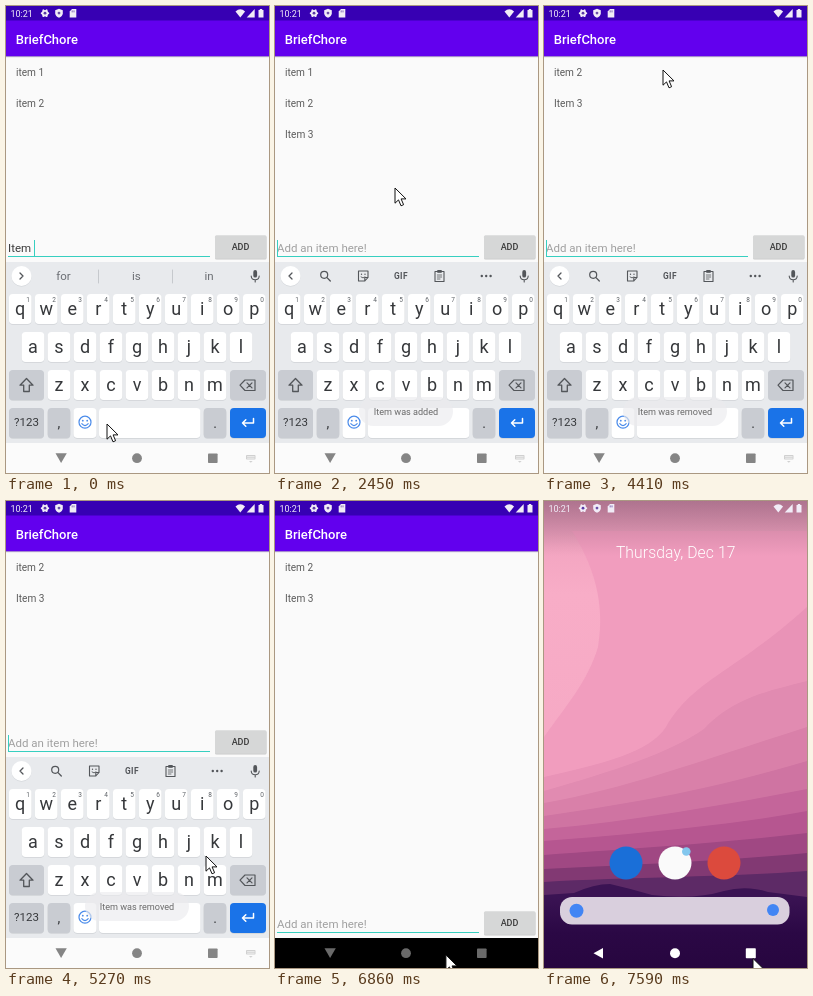
Recreate the animation shown at these times as an HTML page. Size 263 px wide and 467 px high, loop 8000 ms.

```html
<!DOCTYPE html>
<html lang="en">
<head>
<meta charset="utf-8">
<title>To-do list demo</title>
<style>
html, body { margin: 0; width: 100%; height: 100%; overflow: hidden; background: #fafafa; }
svg { display: block; width: 100vw; height: 100vh; font-family: Roboto, "Noto Sans", sans-serif; }
</style>
</head>
<body>
<svg id="stage" viewBox="0 0 263 467"></svg>
<script>
const LOOP = 8000;
const stage = document.getElementById('stage');

// Markup helpers
const rect = (x, y, w, h, fill, r = 0, more = '') =>
  `<rect x="${x}" y="${y}" width="${w}" height="${h}" rx="${r}" fill="${fill}" ${more}/>`;
const circle = (x, y, r, fill, more = '') =>
  `<circle cx="${x}" cy="${y}" r="${r}" fill="${fill}" ${more}/>`;
const path = (d, fill, more = '') => `<path d="${d}" fill="${fill}" ${more}/>`;
const line = (d, color, w = 1.2) =>
  path(d, 'none', `stroke="${color}" stroke-width="${w}" stroke-linecap="round" stroke-linejoin="round"`);
const text = (s, x, y, size, fill, more = '') =>
  `<text x="${x}" y="${y}" font-size="${size}" fill="${fill}" ${more}>${s}</text>`;
const mid = 'text-anchor="middle"';
const group = (id, body, more = '') => `<g id="${id}" ${more}>${body}</g>`;

function statusIcons() {
  const c = '#f1ecf7';
  let teeth = '';
  for (let i = 0; i < 6; i++) {
    const a = i * Math.PI / 3;
    teeth += `M39 7.2L${39 + 3.3 * Math.cos(a)} ${7.2 + 3.3 * Math.sin(a)}`;
  }
  return text('10:21', 4.5, 10.8, 9, c) +
    line(teeth, c, 1.9) + circle(39, 7.2, 3.2, c) + circle(39, 7.2, 1.4, '#5a3aa6') +
    path('M53 2.8L56.8 4.2V7.2Q56.6 10.3 53 11.8Q49.4 10.3 49.2 7.2V4.2Z', c) +
    circle(53, 7.1, 1.4, '#6b50a8') +
    path('M66 3H70.3V11.5H63.7V5.4Z', c) + line('M66.2 4.8V6M68 4.8V6', '#6b50a8', .8) +
    path('M229.5 5.4Q234.3 1.3 239.1 5.4L234.3 11.5Z', c) +
    path('M248.7 3V11.4H240.7Z', c) +
    path('M253.8 3H256.2V4H257.5V11.5H252.5V4H253.8Z', c);
}

function key(label, cx, top, w, fill = '#fff', size = 18, base = 20.5) {
  const x = cx - w / 2;
  return rect(x, top + .8, w, 30, '#cfd2d6', 4) + rect(x, top, w, 30, fill, 4) +
    text(label, cx, top + base, size, '#36383b', mid);
}

function keyboard() {
  const gray = '#c9ccd2', ink = '#53565a';
  let s = rect(0, 256, 263, 181, '#e8eaed');
  [...'qwertyuiop'].forEach((c, i) => {
    const x = 14.2 + i * 26;
    s += key(c, x, 288, 22.6) + text((i + 1) % 10, x + 8, 295.8, 6.5, '#5f6368', mid);
  });
  [...'asdfghjkl'].forEach((c, i) => s += key(c, 27 + i * 26, 326, 22.6));
  [...'zxcvbnm'].forEach((c, i) => s += key(c, 53 + i * 26, 364, 22.6));
  s += key('', 20.5, 364, 35, gray) + key('', 242, 364, 36, gray) +
    line('M20.5 372.5L27 379.2H23.3V385.5H17.7V379.2H14Z', ink, 1.3) +
    line('M239 374H249V384.5H239L234 379.2ZM241 376.8L246 381.8M246 376.8L241 381.8', ink, 1.2);
  s += key('?123', 20.5, 402, 35, gray, 11.5, 18.3) + key(',', 53, 402, 22.6, gray, 14, 19.5) +
    key('', 79, 402, 23, '#fff') + key('', 143.7, 402, 101.5) +
    key('.', 209, 402, 22.6, gray, 14, 19.5) + key('', 242, 402, 36, '#1a73e8');
  s += circle(79, 416.2, 6, 'none', 'stroke="#4a8bea" stroke-width="1.2"') +
    circle(76.8, 414.7, .9, '#4a8bea') + circle(81.2, 414.7, .9, '#4a8bea') +
    line('M75.8 417.7Q79 421.5 82.2 417.7', '#4a8bea', 1.1) +
    line('M247.5 412.5V417H236.5M239.8 413.7L236.5 417L239.8 420.3', '#fff', 1.5);
  // Toolbar
  s += circle(15.5, 270.7, 10, '#d6d9dd') + circle(15.5, 270, 10, '#fff') +
    rect(247.3, 264, 3.8, 7.6, ink, 1.9) +
    line('M245.2 270Q245.4 273.7 249.2 273.7Q253 273.7 253.2 270M249.2 273.8V276', ink, 1.1);
  s += group('suggest',
    line('M14 267L17 270L14 273', ink, 1.3) +
    ['for', 'is', 'in'].map((w, i) => text(w, 57.5 + i * 72.8, 274.3, 11.5, '#6a6d72', mid)).join('') +
    line('M92.5 264V277M166.5 264V277', '#c6c9cd', 1));
  s += group('tools',
    line('M17 267L14 270L17 273', ink, 1.3) +
    circle(49.2, 268.8, 3.5, 'none', `stroke="${ink}" stroke-width="1.2"`) + line('M52 271.6L55.3 275', ink, 1.3) +
    line('M83.5 265H93V271.5L89.8 275H83.5ZM93 271.5H89.8V275', ink, 1.1) +
    circle(86.5, 268.3, .7, ink) + circle(90, 268.3, .7, ink) + line('M86 271Q88 273 90 271', ink, .9) +
    text('GIF', 126, 273, 8.4, ink, mid + ' font-weight="700" letter-spacing=".4"') +
    line('M160 265.5H169V275.5H160Z', ink, 1.1) + rect(162.3, 264, 4.4, 2.8, ink) +
    line('M162.3 269H166.7M162.3 271H166.7M162.3 273H165', ink, .8) +
    [206.8, 211.2, 215.6].map(x => circle(x, 270, 1.2, ink)).join(''));
  return s;
}

function inputRow() {
  return rect(209, 230, 51.5, 23.6, '#c9c9c9', 1.5) +
    rect(209, 229.3, 51.5, 23.5, '#d6d7d7', 1.5, 'id="button"') +
    text('ADD', 234.5, 244.3, 9, '#3a3a3a', mid + ' font-weight="500"') +
    text('', 2, 246, 11.5, '#333', 'id="field"') +
    rect(2, 250, 202, 1, '#37cfc0') +
    rect(0, 234, 1, 16, '#37cfc0', 0, 'id="caret"');
}

function appNav() {
  const c = '#858585';
  return rect(0, 437, 263, 30, '#fbfbfb', 0, 'id="navBack"') +
    group('navIcons', path('M49.5 447.3H60.8L55.1 457Z', c) + circle(131, 452.2, 4.9, c) +
      rect(202, 447.4, 9.6, 9.6, c, .8)) +
    group('navKeys', rect(240, 449, 9.5, 4.6, '#d0d0d0', .8) +
      line('M241.5 450.6H248.2M241.5 452.2H248.2', '#fff', .6) + path('M243 455H246.6L244.8 456.8Z', '#d0d0d0'));
}

function home() {
  const bands = [
    ['#f19dbe', 'M28 30C48 62 62 100 54 146C44 180 22 205 0 236V467H263V30Z'],
    ['#e993b7', 'M0 276C60 262 105 252 122 226C150 178 190 172 263 106V467H0Z'],
    ['#e18bb1', 'M0 290C70 270 125 252 160 228C190 196 225 190 263 180V467H0Z'],
    ['#d980a9', 'M0 302C80 288 150 262 263 226V467H0Z'],
    ['#cf74a2', 'M0 315C90 302 170 288 263 260V467H0Z'],
    ['#c4659a', 'M0 328C90 320 180 304 263 288V467H0Z'],
    ['#b65690', 'M0 340C80 334 190 324 263 310V467H0Z'],
    ['#a04883', 'M0 354C80 348 180 342 263 332V467H0Z'],
    ['#823973', 'M0 368C80 364 180 360 263 352V467H0Z'],
    ['#5d2a66', 'M0 381C80 376 190 376 263 370V467H0Z'],
    ['#3a1353', 'M0 394L30 392Q50 383 66 383Q88 388 108 394Q150 399 180 390Q202 384 224 391L263 396V467H0Z']
  ];
  let s = `<defs><linearGradient id="sky" x2="0" y2="1">
    <stop stop-color="#d490ad"/><stop offset=".1" stop-color="#f3a5c1"/><stop offset=".2" stop-color="#f8adc7"/><stop offset="1" stop-color="#f3a3c1"/></linearGradient>
    <linearGradient id="shade" x2="0" y2="1"><stop stop-color="#6b4058" stop-opacity=".36"/><stop offset="1" stop-color="#6b4058" stop-opacity="0"/></linearGradient>
    <linearGradient id="ground" x2="0" y2="1"><stop stop-color="#2b0845" stop-opacity="0"/><stop offset=".5" stop-color="#2b0845"/><stop offset="1" stop-color="#27063f"/></linearGradient></defs>`;
  s += rect(0, 0, 263, 467, 'url(#sky)');
  for (const [fill, d] of bands) s += path(d, fill);
  s += rect(0, 0, 263, 55, 'url(#shade)') + rect(0, 396, 263, 71, 'url(#ground)');
  s += group('dock',
    text('Thursday, Dec 17', 131.7, 56.5, 15.7, '#fff', mid + ' font-weight="300" letter-spacing=".1"') +
    circle(82, 362, 16.5, '#1a6fd8') + circle(131, 362, 16.5, '#fafafa') +
    circle(142.3, 350.5, 4.3, '#83c7ee') + circle(180, 362, 16.5, '#dc4a3d') +
    rect(16, 396, 229.5, 27.5, '#d9cfdd', 12) +
    circle(32.5, 409.7, 7, '#4285f4') + circle(229, 409, 6, '#4285f4'));
  return s + path('M59 447V457.4L49.5 452.2Z', '#fff') + circle(131, 452.2, 5, '#fff') +
    rect(201.8, 447.2, 10, 10, '#fff', .8);
}

stage.innerHTML =
  group('home', home()) +
  group('app',
    rect(0, 0, 263, 437, '#fafafa') + rect(0, 50, 263, 1, '#a58ad0') + rect(0, 51, 263, 1, '#eeecf1') +
    rect(0, 0, 263, 15, '#3700b3') + rect(0, 14.5, 263, 35.5, '#6200ee') +
    text('BriefChore', 9.7, 38, 13, '#fff', 'font-weight="500"') +
    [0, 1, 2].map(i => text('', 10, 70 + i * 31, 10.1, '#5c5c5c', `id="row${i}"`)).join('') +
    group('input', inputRow()) + group('keys', keyboard())) +
  group('nav', appNav()) +
  group('toast', rect(0, 391, 0, 29, '#ebecee', 14.5, 'id="pill" opacity=".65"') +
    text('', 131, 409.3, 9.1, '#6a6a6a', mid + ' id="note"')) +
  statusIcons() +
  group('mouse', path('M0 0V15.2L3.5 11.9L6 17.8L8.6 16.7L6.1 10.9H11Z', '#fff', 'stroke="#111" stroke-width="1" stroke-linejoin="round"'));

const el = {};
stage.querySelectorAll('[id]').forEach(n => el[n.id] = n);
const show = (n, on) => n.setAttribute('display', on ? 'inline' : 'none');
const fade = (t, a, b) => Math.min(1, Math.max(0, (t - a) / (b - a)));

// Screen updates come in bursts: first, last, count
const bursts = [[150, 150, 1], [450, 1390, 7], [1540, 2580, 9], [2720, 3260, 5],
  [3560, 4410, 7], [4730, 5270, 5], [5670, 6430, 7], [6710, 7590, 7]];
function snap(t) {
  let out = 0;
  for (const [a, b, n] of bursts) {
    if (t < a) break;
    const step = (b - a) / (n - 1) || 1;
    out = a + Math.min(n - 1, Math.floor((t - a) / step + 1e-6)) * step;
  }
  return out;
}

// Pointer stops: time, x, y
const stops = [[0, 101, 418], [450, 101, 418], [610, 120, 398], [770, 182, 315], [920, 237, 238.5],
  [1670, 237, 238.5], [1930, 205, 222], [2320, 124, 188], [2450, 120, 182], [2580, 120, 84],
  [2720, 119, 56], [2855, 119, 46], [3125, 119, 64], [4595, 119, 64], [4730, 150, 92],
  [4865, 224, 172], [5000, 235, 250], [5270, 200, 355], [5600, 200, 355], [5800, 176, 395],
  [6050, 138, 440], [6177, 132, 447], [6430, 132, 448], [6710, 142, 452], [6857, 171, 454],
  [7150, 205, 457], [7590, 209, 457.5]];
function pointer(t) {
  let i = 1;
  while (i < stops.length - 1 && stops[i][0] < t) i++;
  const [t0, x0, y0] = stops[i - 1], [t1, x1, y1] = stops[i];
  const k = fade(t, t0, t1);
  return [x0 + (x1 - x0) * k, y0 + (y1 - y0) * k];
}

const blinks = [0, 150, 450, 2055, 2315, 2715, 3255, 3700, 4120, 4725, 5265, 5665];
const caretOn = t => blinks.filter(b => b <= t).length % 2 === 1;

function draw(time) {
  const t = snap(time);
  const typed = t < 600 ? 'Item ' : t < 1540 ? 'Item 3' : '';
  const items = t < 1540 ? ['item 1', 'item 2'] : t < 3980 ? ['item 1', 'item 2', 'Item 3'] : ['item 2', 'Item 3'];
  items.concat('').slice(0, 3).forEach((s, i) => el['row' + i].textContent = s);

  el.field.textContent = typed || 'Add an item here!';
  el.field.setAttribute('fill', typed ? '#3c3c3c' : '#a0a0a0');
  el.caret.setAttribute('x', typed === 'Item ' ? 28 : typed ? 34 : 2);
  show(el.caret, caretOn(t));
  el.button.setAttribute('fill', t >= 1390 && t < 1670 ? '#c6c7c7' : '#d6d7d7');

  show(el.suggest, t < 760);
  show(el.tools, t >= 760);
  const closed = t >= 6700;
  show(el.keys, !closed);
  el.input.setAttribute('transform', `translate(0 ${closed ? 181 : 0})`);
  el.navBack.setAttribute('fill', closed ? '#000' : '#fbfbfb');
  el.navIcons.setAttribute('opacity', closed ? .8 : 1);
  show(el.navKeys, !closed);

  const removed = t >= 4000;
  const alpha = removed ? fade(t, 4000, 4270) * (1 - fade(t, 5700, 6050))
    : fade(t, 1600, 1930) * (1 - fade(t, 3500, 3840));
  const width = removed ? 104 : 94;
  el.note.textContent = removed ? 'Item was removed' : 'Item was added';
  el.pill.setAttribute('x', 131 - width / 2);
  el.pill.setAttribute('width', width);
  el.toast.setAttribute('opacity', alpha);

  const leave = fade(t, 6860, 7250);
  const zoom = 1 - .35 * leave;
  el.app.setAttribute('transform', `translate(${131.5 * (1 - zoom)} ${233 * (1 - zoom)}) scale(${zoom})`);
  el.app.setAttribute('opacity', 1 - leave);
  show(el.app, leave < 1);
  show(el.nav, leave === 0);
  const settle = fade(t, 6950, 7400);
  el.dock.setAttribute('opacity', settle);
  el.dock.setAttribute('transform', `translate(0 ${14 * (1 - settle) ** 2})`);

  el.mouse.setAttribute('transform', `translate(${pointer(t).join(' ')})`);
}

function tick() {
  draw(performance.now() % LOOP);
  requestAnimationFrame(tick);
}
tick();
</script>
</body>
</html>
```
